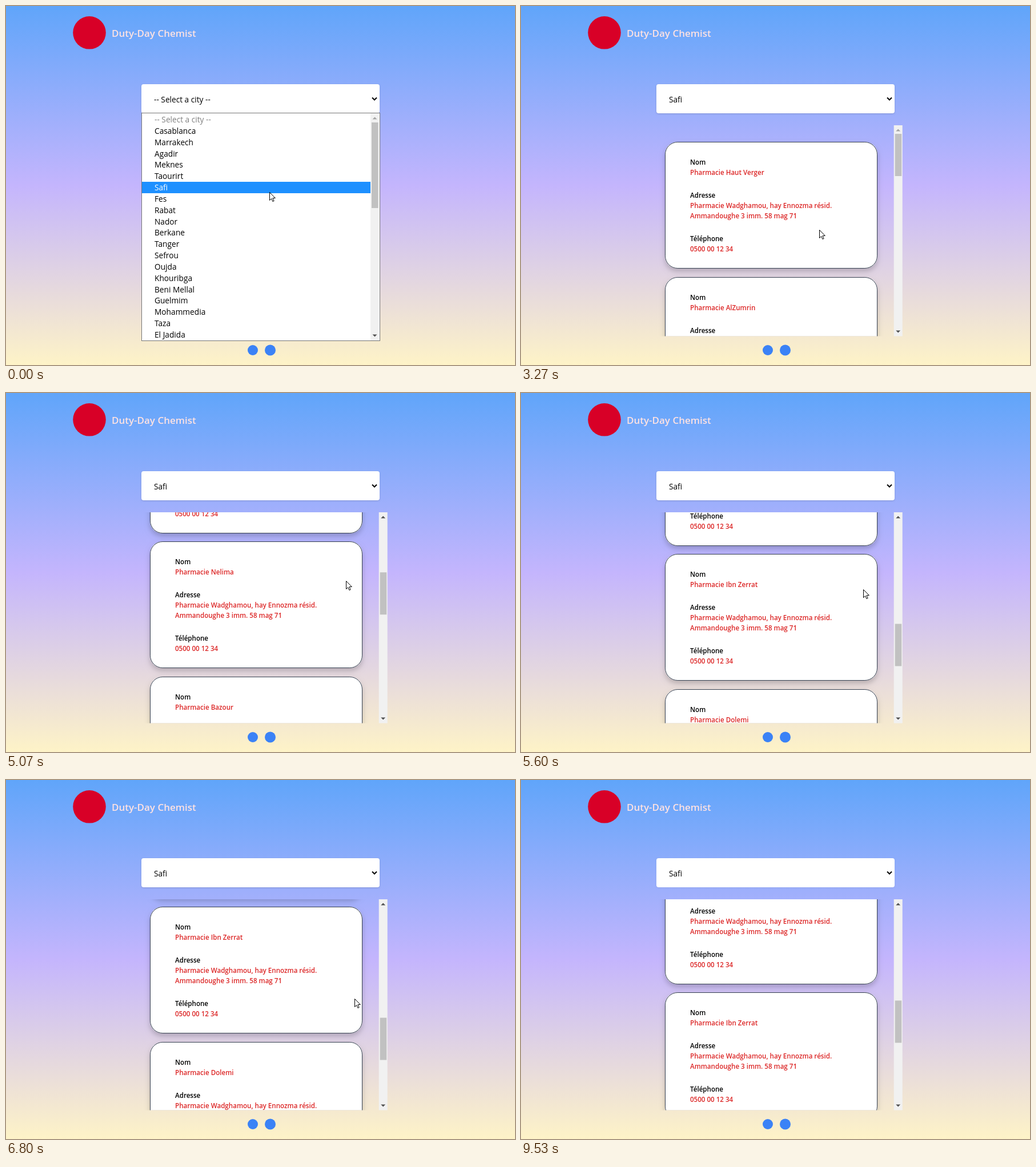
Recreate the animation shown at these times as an HTML page with a canvas. Size 891 by 629 pixels, loop 9670 ms.

```html
<!DOCTYPE html>
<html lang="en">
<head>
<meta charset="utf-8">
<title>Duty-Day Chemist</title>
<style>
  html, body { margin: 0; width: 100%; height: 100%; overflow: hidden; }
  canvas { display: block; }
</style>
</head>
<body>
<canvas id="stage" width="891" height="629"></canvas>
<script>
const ctx = document.getElementById('stage').getContext('2d');
const LOOP = 9670, TICKS_PER_MS = 15 / 1000;
const FAMILY = '"Open Sans", "Noto Sans", sans-serif';
const LIST_FONT = `13.7px ${FAMILY}`, CARD_FONT = `600 11.6px ${FAMILY}`;
const PLACEHOLDER = '-- Select a city --';

const CITIES = ['Casablanca', 'Marrakech', 'Agadir', 'Meknes', 'Taourirt', 'Safi', 'Fes',
  'Rabat', 'Nador', 'Berkane', 'Tanger', 'Sefrou', 'Oujda', 'Khouribga', 'Beni Mellal',
  'Guelmim', 'Mohammedia', 'Taza', 'El Jadida'];
const SHOPS = ['Haut Verger', 'AlZumrin', 'Nelima', 'Bazour', 'Ibn Zerrat', 'Dolemi', 'Al Nezim'];
const CARD_PITCH = 236.6, WHEEL_NOTCH = 90.25;

// The picture advances 15 ticks per second; each move runs from one tick to another.
const CLOSE = 5, RESULTS = 49, BLUR = 143;
const POINTER_START = [461, 326];
const POINTER_MOVES = [
  { from: 8, to: 9, end: [468, 327] },
  { from: 27, to: 32, end: [487, 381] },
  { from: 37, to: 42, end: [522, 392] },
  { from: 64, to: 70, end: [595, 329] },
  { from: 81, to: 92, end: [610, 383] },
  { from: 105, to: 115, end: [445, 604] },
  { from: 117, to: 125, end: [432, 606] },
  { from: 126, to: 130, end: [-20, 640] },
];
const WHEEL_MOVES = [
  { from: 53, to: 61, end: [3] },
  { from: 64, to: 70, end: [5] },
  { from: 76, to: 84, end: [10] },
  { from: 88, to: 92, end: [14] },
  { from: 98, to: 104, end: [9] },
];

function follow(start, moves, tick) {
  return moves.reduce((at, { from, to, end }) => {
    const u = Math.min(1, Math.max(0, (tick - from) / (to - from)));
    return at.map((v, i) => v + (end[i] - v) * u);
  }, start);
}

function rect(x, y, w, h, color) {
  ctx.fillStyle = color;
  ctx.fillRect(x, y, w, h);
}

function disc(x, y, r, color) {
  ctx.fillStyle = color;
  ctx.beginPath();
  ctx.arc(x, y, r, 0, 2 * Math.PI);
  ctx.fill();
}

function text(str, x, y, font, color) {
  ctx.font = font;
  ctx.fillStyle = color;
  ctx.fillText(str, x, y);
}

function panel(x, y, w, h, radius, shadow, offset, blur) {
  ctx.save();
  ctx.shadowColor = shadow;
  ctx.shadowOffsetY = offset;
  ctx.shadowBlur = blur;
  ctx.fillStyle = '#fff';
  ctx.beginPath();
  ctx.roundRect(x, y, w, h, radius);
  ctx.fill();
  ctx.restore();
}

function triangle(x, y, dir, color) {
  ctx.fillStyle = color;
  ctx.beginPath();
  ctx.moveTo(x - 4, y + 2 * dir);
  ctx.lineTo(x + 4, y + 2 * dir);
  ctx.lineTo(x, y - 2 * dir);
  ctx.fill();
}

function scrollbar(x, top, bottom, thumbY, thumbH, atTop) {
  rect(x, top, 15, bottom - top, '#f1f1f1');
  rect(x + 2, thumbY, 11.5, thumbH, '#c1c1c1');
  triangle(x + 7.5, top + 8.5, 1, atTop ? '#a3a3a3' : '#505050');
  triangle(x + 7.5, bottom - 8.5, -1, '#505050');
}

function drawPage() {
  const sky = ctx.createLinearGradient(0, 0, 0, 629);
  sky.addColorStop(0, '#60a5fa');
  sky.addColorStop(0.5, '#c4b5fd');
  sky.addColorStop(1, '#fef3c7');
  rect(0, 0, 891, 629, sky);
  disc(146, 46.8, 28.8, '#d80027');
  text('Duty-Day Chemist', 185, 54, `600 17px ${FAMILY}`, '#fee2e2');
  disc(432, 603, 9, '#3b82f6');
  disc(462.5, 603, 9.5, '#3b82f6');
}

function drawSelect(label, raised) {
  panel(237, 137, 417, 51, 4, `rgba(0,0,0,${raised ? 0.15 : 0.05})`, 1, 3);
  text(label, 259, 169, LIST_FONT, '#000');
  ctx.strokeStyle = '#000';
  ctx.lineWidth = 2;
  ctx.beginPath();
  ctx.moveTo(641, 160.5);
  ctx.lineTo(645, 164.5);
  ctx.lineTo(649, 160.5);
  ctx.stroke();
}

function drawOptions() {
  rect(237, 187, 418, 400, '#767676');
  rect(238, 188, 416, 398, '#fff');
  [PLACEHOLDER, ...CITIES].forEach((label, i) => {
    const y = Math.round(189 + i * 19.84), active = label === 'Safi';
    if (active) rect(238, y, 400, 20, '#1e90ff');
    text(label, 260, y + 15, LIST_FONT, active ? '#fff' : i ? '#000' : '#808080');
  });
  scrollbar(638, 188, 586, 204, 150, true);
}

function drawCard(name, y) {
  panel(252, y, 372, 222, 21.6, 'rgba(0,0,0,.2)', 5, 10);
  ctx.strokeStyle = '#374151';
  ctx.lineWidth = 1;
  ctx.beginPath();
  ctx.roundRect(252.5, y + 0.5, 371, 221, 21.6);
  ctx.stroke();

  let baseline = y + 40;
  const line = (str, color) => {
    text(str, 296, baseline, CARD_FONT, color);
    baseline += 18;
  };
  const field = (label, ...values) => {
    line(label, '#000');
    values.forEach(value => line(value, '#dc2626'));
    baseline += 22;
  };
  field('Nom', 'Pharmacie ' + name);
  field('Adresse', 'Pharmacie Wadghamou, hay Ennozma résid.', 'Ammandoughe 3 imm. 58 mag 71');
  field('Téléphone', '0500 00 12 34');
}

function drawResults(scroll) {
  ctx.save();
  ctx.beginPath();
  ctx.rect(237, 209, 431, 369.5);
  ctx.clip();
  SHOPS.forEach((name, i) => drawCard(name, Math.round(238.3 + i * CARD_PITCH - scroll)));
  scrollbar(652.7, 209, 579, 224 + scroll * 0.2, 74, scroll === 0);
  ctx.restore();
}

function drawPointer(x, y) {
  ctx.save();
  ctx.translate(Math.round(x) + 0.5, Math.round(y) + 0.5);
  ctx.fillStyle = '#fff';
  ctx.strokeStyle = '#000';
  ctx.lineWidth = 1;
  const arrow = new Path2D('M0 0V14L3.2 11L5.4 16L7.6 15L5.4 10.2L9.8 10Z');
  ctx.fill(arrow);
  ctx.stroke(arrow);
  ctx.restore();
}

function draw() {
  const tick = Math.floor((performance.now() % LOOP) * TICKS_PER_MS + 0.1);
  const open = tick < CLOSE;
  drawPage();
  drawSelect(open ? PLACEHOLDER : 'Safi', tick < BLUR);
  if (open) drawOptions();
  if (tick >= RESULTS) drawResults(follow([0], WHEEL_MOVES, tick)[0] * WHEEL_NOTCH);
  drawPointer(...follow(POINTER_START, POINTER_MOVES, tick));
  requestAnimationFrame(draw);
}
draw();
</script>
</body>
</html>
```
